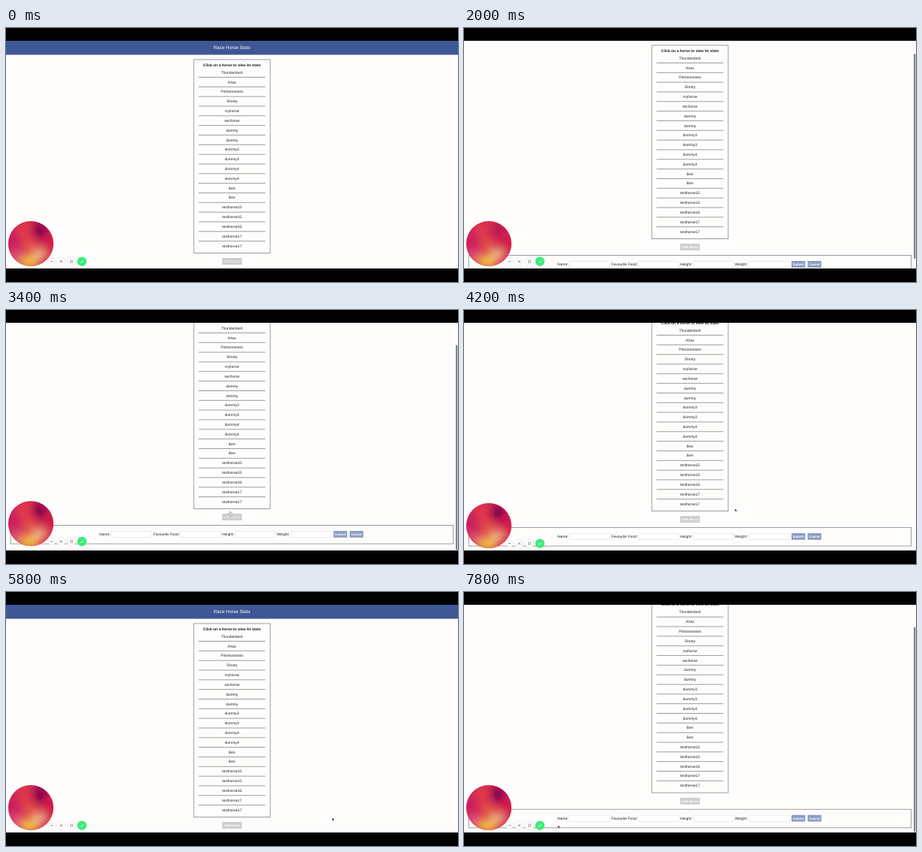
Write an HTML page that moves like this. It is 600 px wide and 338 px high and loops after 8000 ms.

```html
<!DOCTYPE html>
<html lang="en">
<head>
<meta charset="utf-8">
<title>Race Horse Stats</title>
<style>
  html, body { margin: 0; width: 100%; height: 100%; overflow: hidden; background: #000; }
  svg { display: block; width: 100vw; height: 100vh; }
  text { font: 4.95px "Liberation Sans", Arial, sans-serif; text-rendering: geometricPrecision; fill: #222; }
  .mid { text-anchor: middle; }
  .bold { font-weight: bold; fill: #111; }
  .btn { font-size: 4.3px; font-weight: bold; fill: #fff; }
  .frame { fill: none; stroke: #858585; stroke-width: .8; }
  .rule { stroke: #858585; stroke-width: .8; }
  .input { fill: #fff; stroke: #dedede; stroke-width: .6; }
  .knob { fill: #fff; stroke: #ddd; stroke-width: .6; }
  .icon { fill: none; stroke: #777; stroke-width: .8; }
</style>
</head>
<body>
<svg viewBox="0 0 600 338" preserveAspectRatio="none">
  <defs>
    <clipPath id="view"><rect y="17" width="600" height="303"/></clipPath>
    <clipPath id="lens"><circle cx="33" cy="287" r="30"/></clipPath>
    <filter id="blur" x="-50%" y="-50%" width="200%" height="200%"><feGaussianBlur stdDeviation="6"/></filter>
  </defs>
  <rect width="600" height="338"/>
  <g clip-path="url(#view)">
    <rect y="17" width="600" height="303" fill="#fefdfc"/>
    <g id="page">
      <rect y="17" width="600" height="18.6" fill="#3f5796"/>
      <text class="mid" x="300" y="28.3" style="font-size:6.2px;fill:#fff">Race Horse Stats</text>
      <rect class="frame" x="249.2" y="42" width="101.6" height="257.4"/>
      <text class="mid bold" x="300" y="50.6">Click on a horse to view its stats</text>
      <g id="list"></g>
      <rect x="287" y="306" width="26" height="9" fill="#cecece"/>
      <text id="add" class="mid btn" x="300" y="312.1">Add Horse</text>
      <g id="form">
        <rect class="frame" x="6.2" y="321.5" width="587.5" height="24.6"/>
      </g>
    </g>
    <rect id="bar" x="597" width="2.4" height="273" rx="1.2" fill="#858585"/>
    <g id="overlay">
      <g clip-path="url(#lens)">
        <rect x="0" y="254" width="66" height="66" fill="#d62850"/>
        <g id="blobs" filter="url(#blur)"></g>
      </g>
      <circle class="knob" cx="60.5" cy="310.7" r="4.6"/>
      <circle class="knob" cx="73.2" cy="310.7" r="5.6"/>
      <circle class="knob" cx="87" cy="310.7" r="5.6"/>
      <circle cx="100.8" cy="310.7" r="6.2" fill="#3deb7b"/>
      <path class="icon" d="M58.6 310.7h3.8M71.4 308.9l3.6 3.6m0-3.6l-3.6 3.6M85.9 308.4v4.6m2.2-4.6v4.6"/>
      <path class="icon" style="stroke:#fff" d="M98.7 310.9l1.4 1.4 2.8-3.2"/>
    </g>
    <g id="cursor">
      <path id="arrow" d="M0 0v3.8l1-.9.7 1.5.7-.3-.7-1.5h1.3z" fill="#111" stroke="#fff" stroke-width=".3"/>
      <path id="hand" d="M0 0q.7-.5 1 .3v1.5l2 .6v1.6l-.7 1.3h-2.2l-1.7-2 .5-.6 1.1.7z" fill="#fff" stroke="#555" stroke-width=".5"/>
    </g>
  </g>
</svg>
<script>
const $ = id => document.getElementById(id);
const LOOP = 8000, STEP = 200, MAX = 32.3;

const horses = ("Thunderdash Artax Potoooooooo Shorty myhorse sechorse dummy dummy dummy3 dummy3 " +
  "dummy4 dummy4 Ben Ben testhorse15 testhorse15 testhorse16 testhorse17 testhorse17").split(" ");
$("list").innerHTML = horses.map((name, i) => {
  const y = 60.7 + i * 12.83, line = y + 4.8;
  return `<text class="mid" x="300" y="${y}">${name}</text>` +
    (i < horses.length - 1 ? `<path class="rule" d="M255.5 ${line}H344.3"/>` : "");
}).join("");

const fields = [["Name:", 124, 140], ["Favourite Food:", 195.5, 231.5], ["Height:", 287, 304], ["Weight:", 359.5, 378]];
const buttons = [["Submit", 434.7], ["Cancel", 456.2]];
$("form").innerHTML += fields.map(([label, x, box]) =>
  `<text x="${x}" y="335.1">${label}</text><rect class="input" x="${box}" y="329.4" width="53.8" height="8.2"/>`
).join("") + buttons.map(([label, x]) =>
  `<rect x="${x}" y="329" width="18.2" height="8.8" fill="#8b9dc3"/><text class="mid btn" x="${x + 9.1}" y="334.9">${label}</text>`
).join("");

// x, y, rx, ry, colour
const blobs = [
  [10, 282, 9, 20, "#c81c60"], [23, 270, 9, 13, "#e23a48"], [45, 269, 9, 11, "#790550"],
  [57, 287, 7, 16, "#d3164c"], [13, 304, 10, 8, "#e0507a"], [32, 290, 9, 7, "#e5603f"],
  [31, 311, 13, 9, "#efc53c"], [44, 301, 9, 7, "#ecc48c"]
];
$("blobs").innerHTML = blobs.map(([x, y, rx, ry, c]) =>
  `<ellipse cx="${x}" cy="${y}" rx="${rx}" ry="${ry}" fill="${c}"/>`).join("");
const shade = $("blobs").children[2];

// Linear interpolation over rows of [time, ...values]
function track(keys, t) {
  const i = keys.findIndex(k => k[0] > t);
  if (i < 0) return keys[keys.length - 1].slice(1);
  if (i === 0) return keys[0].slice(1);
  const a = keys[i - 1], b = keys[i], p = (t - a[0]) / (b[0] - a[0]);
  return a.slice(1).map((v, j) => v + (b[j + 1] - v) * p);
}

const scrollKeys = [[1600, 0], [1800, 8], [2000, 19], [2200, 29], [2400, MAX], [3200, MAX], [3400, 35],
  [3600, 33], [3800, 32], [4200, 32], [5000, 32.4], [5200, MAX], [5400, 4], [5600, 0], [7200, 0], [7400, 12],
  [7600, 27], [7800, MAX]];
const cursorKeys = [[2600, 299, 284], [3400, 297, 268.3], [3600, 300, 269], [4200, 359.6, 264.4],
  [5000, 481, 306.5], [5200, 468, 302], [5400, 466, 301], [6200, 400, 300], [7000, 315.8, 297.8],
  [7200, 306, 308], [7400, 296, 309], [7800, 124.6, 310.4]];

const within = (t, ...spans) => spans.some(([a, b]) => t >= a && t < b);
const show = (id, on) => $(id).setAttribute("visibility", on ? "visible" : "hidden");
const move = (id, x, y) => $(id).setAttribute("transform", `translate(${x} ${y})`);

function draw(now) {
  const t = Math.floor(now % LOOP / STEP) * STEP;
  const [scroll] = track(scrollKeys, t), [x, y] = track(cursorKeys, t);
  move("page", 0, -scroll);
  move("overlay", 0, Math.min(0, MAX - scroll));
  move("cursor", x, y);
  $("bar").setAttribute("y", 17 + Math.min(scroll, MAX) * .91);
  show("form", within(t, [1400, 5400], [7200, LOOP]));
  show("bar", within(t, [1600, 3800], [4600, 5400], [7200, LOOP]));
  const seen = t >= 2600, hand = within(t, [3200, 3700], [7100, 7500]);
  show("hand", seen && hand);
  show("arrow", seen && !hand);
  $("add").style.fill = within(t, [0, 1800], [3200, 3700], [6900, 7500]) ? "#e8e8e8" : "#fff";
  shade.setAttribute("fill-opacity", within(t, [1800, 2400]) ? .35 : 1);
  requestAnimationFrame(() => draw(performance.now() - start));
}
const start = performance.now();
draw(0);
</script>
</body>
</html>
```
